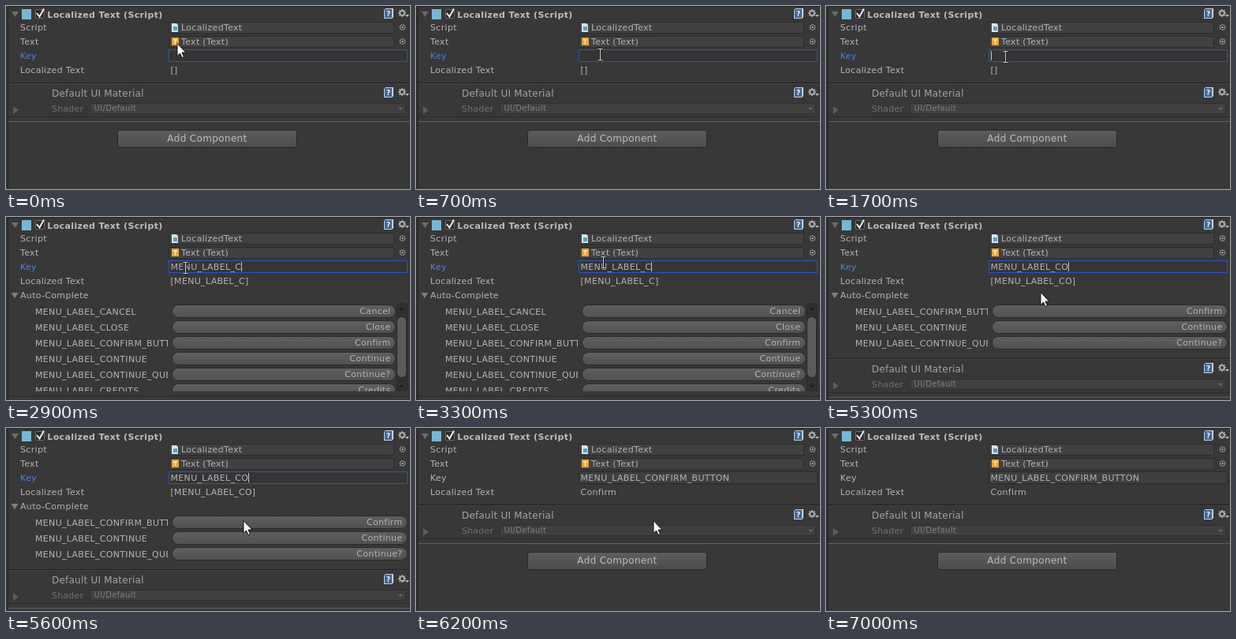
Recreate the animation shown at these times as an HTML page with a canvas. Size 512 px wide and 232 px high, loop 8300 ms.

```html
<!DOCTYPE html>
<html lang="en">
<head>
<meta charset="utf-8">
<title>Localized Text inspector</title>
<style>
html, body { margin: 0; width: 100%; height: 100%; overflow: hidden; background: #383838; }
canvas { display: block; }
</style>
</head>
<body>
<canvas id="stage" width="512" height="232"></canvas>
<script>
const ctx = document.getElementById('stage').getContext('2d');
const LOOP = 8300;
const LIGHT = '#b4b4b4';

// [start ms, shape, x, y]: arrow tip or centre of the I-beam
const POINTER = [
  [0, 'arrow', 217, 47], [100, 'arrow', 224, 52], [200, 'beam', 233, 63], [300, 'beam', 240, 66],
  [700, 'beam', 233, 61], [800, 'beam', 228, 63], [1000, 'beam', 228, 64], [1300, 'beam', 227, 64],
  [3300, 'beam', 237, 57], [5300, 'arrow', 272, 95], [5400, 'arrow', 294, 121], [5600, 'arrow', 301, 117],
  [6800, 'arrow', 293, 148], [6900, 'arrow', 273, 202], [7000, 'none', 0, 0]
];

// [start ms, key, localized text, focused, caret, suggestions]
const ALL = [
  ['CANCEL', 'Cancel'], ['CLOSE', 'Close'], ['CONFIRM_BUTTON', 'Confirm'],
  ['CONTINUE', 'Continue'], ['CONTINUE_QUESTION', 'Continue?'], ['CREDITS', 'Credits']
];
const STATES = [
  [0, '', '[]', true, false, []],
  [1700, '', '[]', true, true, []],
  [2900, 'MENU_LABEL_C', '[MENU_LABEL_C]', true, true, ALL],
  [4100, 'MENU_LABEL_CO', '[MENU_LABEL_CO]', true, true, ALL.slice(2, 5)],
  [6200, 'MENU_LABEL_CONFIRM_BUTTON', 'Confirm', false, false, []]
];

const at = (list, t) => list.findLast(item => item[0] <= t);

function rect(x, y, w, h, color) {
  ctx.fillStyle = color;
  ctx.fillRect(x, y, w, h);
}

function box(x, y, w, h, fill, border, radius = 0) {
  ctx.beginPath();
  ctx.roundRect(x + .5, y + .5, w - 1, h - 1, radius);
  ctx.fillStyle = fill;
  ctx.fill();
  ctx.lineWidth = 1;
  ctx.strokeStyle = border;
  ctx.stroke();
}

function shade(y, h, top, bottom) {
  const g = ctx.createLinearGradient(0, y, 0, y + h);
  g.addColorStop(0, top);
  g.addColorStop(1, bottom);
  return g;
}

function text(str, x, y, { color = LIGHT, size = 11, weight = '', align = 'left', spacing = .32 } = {}) {
  ctx.font = `${weight} ${size}px "DejaVu Sans", sans-serif`;
  ctx.letterSpacing = spacing + 'px';
  ctx.textAlign = align;
  ctx.fillStyle = color;
  ctx.fillText(str, x, y);
}

function poly(points, fill, stroke) {
  ctx.beginPath();
  points.forEach(([x, y]) => ctx.lineTo(x, y));
  ctx.closePath();
  ctx.fillStyle = fill;
  ctx.fill();
  if (stroke) {
    ctx.lineWidth = 1;
    ctx.strokeStyle = stroke;
    ctx.stroke();
  }
}

function line(points, color, width) {
  ctx.beginPath();
  points.forEach(([x, y]) => ctx.lineTo(x, y));
  ctx.strokeStyle = color;
  ctx.lineWidth = width;
  ctx.stroke();
}

function ring(x, y, r, color, width) {
  ctx.beginPath();
  ctx.arc(x, y, r, 0, Math.PI * 2);
  ctx.strokeStyle = color;
  ctx.lineWidth = width;
  ctx.stroke();
}

const foldout = (x, y, color) => poly([[x, y], [x + 9, y], [x + 4.5, y + 7]], color);

function headerIcons(y) {
  poly([[481, y], [491, y], [491, y + 11], [489, y + 13], [479, y + 13], [479, y + 2]], '#c3cfdc');
  rect(480, y + 1, 9, 11, '#3f6797');
  text('?', 484.5, y + 10, { size: 9, weight: 'bold', color: '#eef3f9', align: 'center', spacing: 0 });
  const cx = 502, cy = y + 6;
  for (let i = 0; i < 8; i++) {
    const c = Math.cos(i * Math.PI / 4), s = Math.sin(i * Math.PI / 4);
    line([[cx + 3 * c, cy + 3 * s], [cx + 5 * c, cy + 5 * s]], '#b0b0b0', 1.6);
  }
  ring(cx, cy, 2.8, '#b0b0b0', 1.7);
  poly([[506, y + 8], [511, y + 8], [508.5, y + 11]], '#b8b8b8');
}

function objectField(y, label, value) {
  text(label, 18, y + 11);
  box(206, y, 286, 15, '#414141', '#2c2c2c', 1);
  text(value, 222, y + 11);
  ring(502.5, y + 7, 3.3, '#a4a4a4', 1);
  rect(501.5, y + 6, 2, 2, '#b4b4b4');
}

function component([, key, localized, focused, caret]) {
  foldout(7, 7, '#6c6c6c');
  rect(20, 4, 12, 13, '#78b7d3');
  box(37, 4, 12, 12, '#2b2b2b', '#6b6b6b', 1);
  line([[39, 9], [42.5, 13.5], [48, 3.5]], '#eeeeee', 2);
  text('Localized Text (Script)', 52.3, 15, { weight: 'bold', color: '#bebebe', spacing: .36 });
  headerIcons(3);

  objectField(20, 'Script', 'LocalizedText');
  poly([[210, 22], [216, 22], [218, 24], [218, 33], [210, 33]], '#d9e2e5');
  rect(212, 26, 5, 5, '#569fbe');
  objectField(38, 'Text', 'Text (Text)');
  rect(210, 40, 9, 10, '#e9a33c');
  line([[212, 43], [217, 43]], '#fff3d6', 1.5);
  line([[214.5, 43], [214.5, 48]], '#fff3d6', 1.5);

  text('Key', 18, 67, { color: focused ? '#4b81df' : LIGHT });
  box(206, 55, 303, 16, focused ? '#353535' : '#3f3f3f', focused ? '#2c51c8' : '#292929', focused ? 0 : 1);
  text(key, 208.5, 67);
  if (caret) rect(Math.round(208.5 + ctx.measureText(key).width), 57, 1, 12, '#c8c8c8');
  text('Localized Text', 18, 85);
  text(localized, 208.5, 85);
}

function scrollbar() {
  box(495, 109, 14, 113, '#303030', '#282828', 4);
  box(495, 126, 13, 78, '#5b5b5b', '#292929', 6);
  poly([[499, 118], [504, 118], [501.5, 114]], '#1c1c1c');
  poly([[499, 213], [504, 213], [501.5, 217]], '#1c1c1c');
}

function suggestions(list) {
  const scrolls = list.length > 5;
  const right = scrolls ? 494 : 509;
  foldout(6.5, 96, '#808080');
  text('Auto-Complete', 18, 103);
  ctx.save();
  ctx.beginPath();
  ctx.rect(0, 108, 512, 113);
  ctx.clip();
  list.forEach(([key, label], i) => {
    const y = 111 + 20 * i;
    ctx.save();
    ctx.beginPath();
    ctx.rect(30, 108, 175, 113);
    ctx.clip();
    text('MENU_LABEL_' + key, 37, y + 13);
    ctx.restore();
    box(210, y, right - 210, 17, shade(y, 17, '#606060', '#505050'), '#2a2a2a', 8);
    text(label, right - 6.5, y + 12, { align: 'right' });
  });
  if (scrolls) scrollbar();
  ctx.restore();
}

function material(offset) {
  ctx.save();
  ctx.translate(0, offset);
  rect(3, 97, 509, 1, '#222222');
  rect(3, 98, 509, 1, '#424242');
  text('Default UI Material', 58, 115, { size: 12, color: '#a4a4a4', spacing: .22 });
  headerIcons(103);
  poly([[9, 127], [16, 132], [9, 137]], '#5c5c5c');
  text('Shader', 58, 134, { color: '#707070', spacing: .2 });
  box(106, 123, 401, 14, '#404040', '#303030', 2);
  text('UI/Default', 111.5, 133, { size: 10, color: '#808080', spacing: .35 });
  poly([[497, 129], [503, 129], [500, 132]], '#696969');
  rect(3, 140, 509, 1, '#2a2a2a');
  rect(3, 146, 509, 1, '#606060');
  box(141, 157, 228, 23, shade(157, 23, '#5d5d5d', '#4c4c4c'), '#282828', 3);
  text('Add Component', 255, 172, { size: 12, align: 'center', color: '#bdbdbd', spacing: .35 });
  ctx.restore();
}

function pointer([, shape, x, y]) {
  if (shape === 'none') return;
  ctx.save();
  if (shape === 'arrow') {
    ctx.translate(x, y + .5);
    poly([[0, 0], [0, 16], [3.5, 12.5], [6, 18], [8.5, 17], [6, 11.5], [11, 11.5]], '#ffffff', '#111111');
  } else {
    ctx.translate(x + .5, y + .5);
    const bars = [[[-3, -7], [3, -7]], [[0, -7], [0, 7]], [[-3, 7], [3, 7]]];
    bars.forEach(b => line(b, '#1c1c1c', 2.4));
    bars.forEach(b => line(b, '#d8d4c4', 1));
  }
  ctx.restore();
}

function draw(now) {
  const t = now % LOOP;
  const state = at(STATES, t);
  const list = state[5];
  rect(0, 0, 512, 232, '#383838');
  rect(0, 0, 2, 232, '#303030');
  rect(2, 0, 1, 232, '#252525');
  rect(3, 0, 509, 1, '#242424');
  component(state);
  if (list.length) suggestions(list);
  material(list.length ? Math.min(22 + 20 * list.length, 130) : 0);
  pointer(at(POINTER, t));
}

const start = performance.now();
function tick() {
  draw(performance.now() - start);
  requestAnimationFrame(tick);
}
tick();
</script>
</body>
</html>
```
